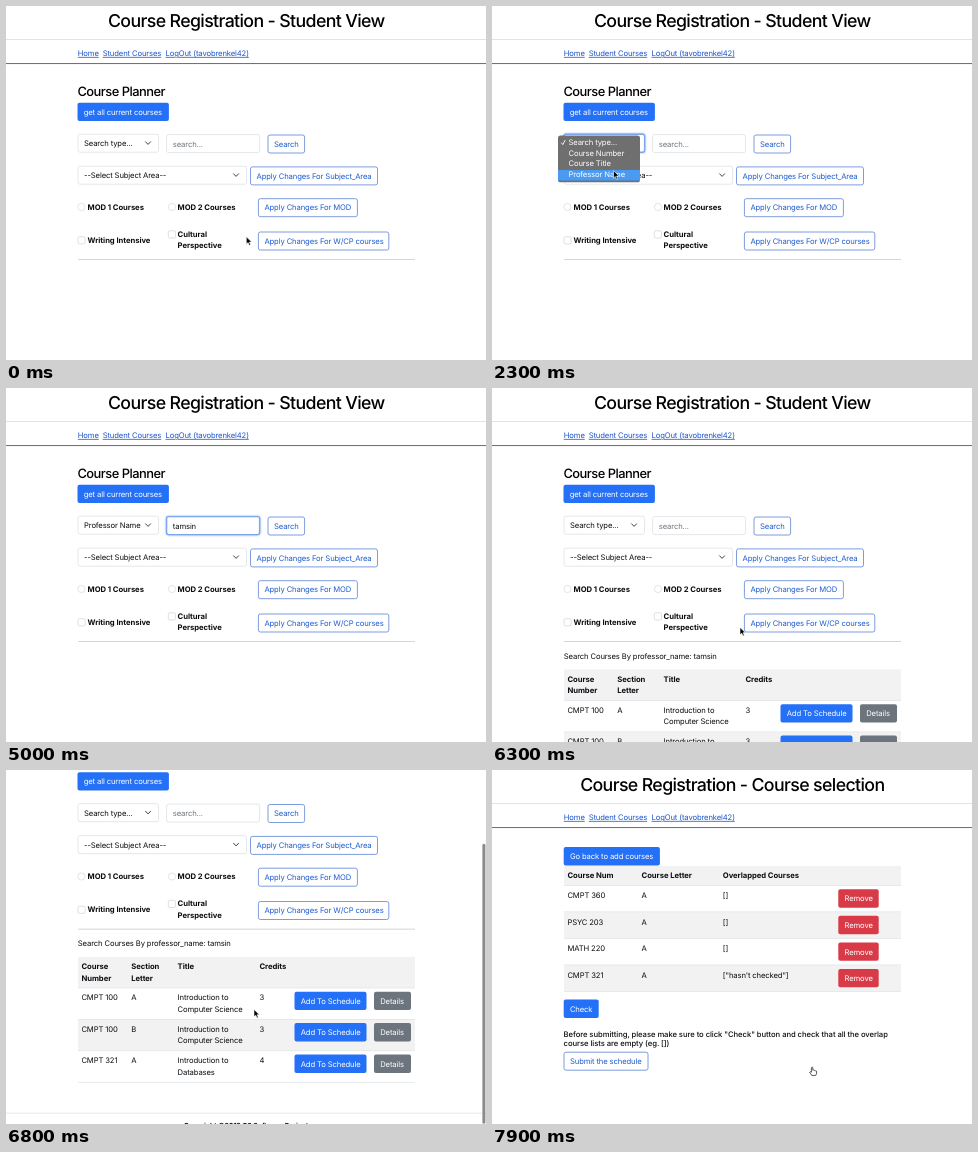
These frames come from a looping animation (480 px wide and 354 px high, 8 s). An HTML page:

```html
<!DOCTYPE html>
<html lang="en">
<head>
<meta charset="utf-8">
<title>Course Registration</title>
<style>
html, body { margin: 0; width: 100%; height: 100%; overflow: hidden; background: #fff; }
svg { display: block; width: 100vw; height: 100vh; }
text { font: 7.68px Inter, "Open Sans", sans-serif; letter-spacing: -.0176em; fill: #0c0e11; white-space: pre; text-rendering: geometricPrecision; }
.h1, .h3 { font-weight: 500; fill: #000; }
.h1 { font-size: 17.76px; letter-spacing: -.0355em; text-anchor: middle; }
.h3 { font-size: 12.9px; letter-spacing: -.04em; }
.b { font-weight: 700; letter-spacing: -.007em; }
.m { font-weight: 500; letter-spacing: -.009em; }
.w { fill: #fff; }
.hint { fill: #70767c; }
.blue { fill: #1f5cd0; }
.link { fill: #1a55c8; text-decoration: underline; }
.foot { font-size: 7px; font-weight: 700; text-anchor: middle; }
</style>
</head>
<body>
<svg id="stage" viewBox="0 0 480 354" preserveAspectRatio="none"></svg>
<script>
const BLUE = '#2470f6', EDGE = '#5c85d6', GRAY = '#6c757d', RED = '#d93a48', LINE = '#d9dde0', BAND = '#f2f2f2';
const LOOP = 8000, MAX_SCROLL = 94.5;
const QUERY = 'tamsin', USER = 'tavobrenkel42';
const MENU = ['Search type...', 'Course Number', 'Course Title', 'Professor Name'];

const text = (x, y, s, cls = '', id = '') => `<text x="${x}" y="${y}" class="${cls}" id="${id}">${s}</text>`;
const rect = (x, y, w, h, fill, extra = '') => `<rect x="${x}" y="${y}" width="${w}" height="${h}" fill="${fill}" ${extra}/>`;
const rule = (x, y, w, color, size = .7) => rect(x, y - size / 2, w, size, color);
const solid = (x, y, w, label, fill = BLUE, id = '') =>
  rect(x, y - .3, w, 18.4, fill, `rx="2" id="${id}"`) + text(x + 6.2, y + 11.8, label, 'w');
const outline = (x, y, w, label, id = '') =>
  `<g id="${id}">` + rect(x, y, w, 18, '#fff', `rx="2" stroke="${EDGE}" stroke-width=".8"`) +
  text(x + 6, y + 11.7, label, 'blue') + '</g>';
const field = (x, y, w, id = '') =>
  rect(x, y, w, 18, '#fff', `rx="2" stroke="${LINE}" stroke-width=".7" id="${id}"`);
const select = (x, y, w, label, id) => field(x, y, w, id + 'Box') + text(x + 6, y + 11.8, label, '', id) +
  `<path d="M${x + w - 13} ${y + 7.6}l2.5 2.6 2.5-2.6" fill="none" stroke="#343a40" stroke-width=".95" stroke-linecap="round"/>`;
const radio = (x, y) => `<circle cx="${x}" cy="${y}" r="3.6" fill="#fff" stroke="#d2d2d2" stroke-width=".6"/>`;
const check = (x, y) => rect(x, y, 7.2, 7.2, '#fff', 'rx="1.6" stroke="#cacaca" stroke-width=".6"');

const header = title =>
  text(240.3, 21.2, title, 'h1') + rule(0, 33.4, 480, '#dcdcdc', .8) +
  text(71.8, 49.9, 'Home', 'link') + text(96.7, 49.9, 'Student Courses', 'link') +
  text(159.5, 49.9, `LogOut (${USER})`, 'link') + rule(0, 57.6, 480, '#5c5c5c', .9);

function results() {
  const courses = [
    ['CMPT 100', 'A', 'Computer Science', 3],
    ['CMPT 100', 'B', 'Computer Science', 3],
    ['CMPT 321', 'A', 'Databases', 4]
  ];
  let s = text(71.8, 270.5, 'Search Courses By professor_name: ' + QUERY) + rect(72, 281.5, 337, 31, BAND) +
    text(75.4, 293.6, 'Course', 'b') + text(75.4, 305.1, 'Number', 'b') +
    text(125.2, 293.6, 'Section', 'b') + text(125.2, 305.1, 'Letter', 'b') +
    text(171.6, 293.6, 'Title', 'b') + text(253.5, 293.6, 'Credits', 'b');
  courses.forEach(([code, letter, topic, credits], i) => {
    const y = 312.5 + 31.4 * i, base = y + 12.4;
    if (i % 2) s += rect(72, y, 337, 31.4, BAND);
    s += rule(72, y, 337, '#dee2e6') + text(75.4, base, code) + text(125.2, base, letter) +
      text(171.6, base, 'Introduction to') + text(171.6, base + 11.5, topic) + text(253.5, base, credits) +
      solid(288.5, y + 4, 72, 'Add To Schedule', BLUE, 'add' + i) + solid(368, y + 4, 37, 'Details', GRAY);
  });
  return s + rule(72, 406.8, 337, '#dee2e6') + rule(0, 437.6, 480, '#dcdcdc') +
    text(240, 452, 'Copyright ©2019 CS Software Project', 'foot');
}

const planner = () => header('Course Registration - Student View') +
  text(71.4, 90, 'Course Planner', 'h3') + solid(71.5, 97, 91.4, 'get all current courses') +
  select(72, 128.2, 80.6, MENU[0], 'kind') +
  field(160.6, 128.6, 93, 'input') + text(166.8, 140.6, 'search...', 'hint', 'typed') +
  '<rect id="caret" y="133.5" width=".6" height="8.5" fill="#222"/>' +
  outline(262, 129, 36.6, 'Search', 'search') +
  select(72, 160.2, 168.6, '--Select Subject Area--', 'area') +
  outline(244.5, 160.9, 127, 'Apply Changes For Subject_Area') +
  radio(75.4, 201) + text(81.6, 203.7, 'MOD 1 Courses', 'b') +
  radio(166, 201) + text(171.6, 203.7, 'MOD 2 Courses', 'b') +
  outline(252.4, 192.7, 99, 'Apply Changes For MOD') +
  check(72, 230.7) + text(81.6, 236.8, 'Writing Intensive', 'b') +
  check(162.3, 224.8) + text(171.6, 230.9, 'Cultural', 'b') + text(171.6, 242.4, 'Perspective', 'b') +
  outline(252.4, 226, 130.4, 'Apply Changes For W/CP courses') +
  rule(72, 253.6, 337, '#c4c4c4') + `<g id="results">${results()}</g>`;

function schedule() {
  const rows = ['CMPT 360', 'PSYC 203', 'MATH 220', 'CMPT 321'];
  let s = header('Course Registration - Course selection') +
    solid(71.7, 77.4, 96.2, 'Go back to add courses') + rect(72, 96, 337, 19.3, BAND) +
    text(75.4, 108.2, 'Course Num', 'b') + text(149.6, 108.2, 'Course Letter', 'b') +
    text(230.8, 108.2, 'Overlapped Courses', 'b');
  rows.forEach((code, i) => {
    const y = 115.3 + 26.55 * i, base = y + 12.8;
    if (i % 2) s += rect(72, y, 337, 26.5, BAND);
    s += rule(72, y, 337, '#dee2e6') + text(75.4, base, code) + text(149.6, base, 'A') +
      text(230.8, base, i < 3 ? '[]' : '["hasn\'t checked"]') + solid(346.3, y + 4.3, 40.4, 'Remove', RED);
  });
  return s + rule(72, 221.5, 337, '#dee2e6') + solid(71.7, 229.8, 35, 'Check') +
    text(71.6, 267, 'Before submitting, please make sure to click "Check" button and check that all the overlap', 'm') +
    text(71.6, 276.2, 'course lists are empty (eg. [])', 'm') + outline(72, 282.2, 84, 'Submit the schedule');
}

const menu = () => rect(66, 129.5, 82, 46.8, '#6f6f6f', 'rx="2.6"') +
  rect(66, 0, 82, 10.6, '#4a9af2', 'id="pick"') +
  '<path d="M69.3 136.6l1.5 2 2.5-4.6" fill="none" stroke="#fff" stroke-width=".9"/>' +
  MENU.map((s, i) => text(76.5, 139.1 + 10.65 * i, s, 'w')).join('');

const cursor = () => '<circle id="ring" r="10.4" fill="none" stroke="#222" stroke-width="1"/>' +
  '<path id="arrow" d="M0 0V7.4L1.8 5.8 3 8.6 4.3 8 3.1 5.3H5.4Z" fill="#000" stroke="#fff" stroke-width=".6"/>' +
  '<path id="beam" d="M-1.3-4Q0-4 0-3Q0-4 1.3-4M0-3V3M-1.3 4Q0 4 0 3Q0 4 1.3 4" fill="none" stroke="#222" stroke-width=".7"/>' +
  '<path id="hand" d="M-.6.4Q0-.7.8.3V3Q1.7 2.5 2.2 3.2 3 2.8 3.5 3.6 4.6 3.4 4.6 4.6V6Q4.4 7 3.8 8.2H-.2Q-1.2 6.6-2.4 5.2-2.2 4-.6 5Z" fill="#fff" stroke="#222" stroke-width=".75" stroke-linejoin="round"/>';

const stage = document.getElementById('stage');
stage.innerHTML = rect(0, 0, 480, 354, '#fff') +
  `<g id="planner">${planner()}</g><g id="schedule">${schedule()}</g><g id="menu">${menu()}</g>` +
  rect(476.4, 0, 3, 280, '#8b8b8b', 'rx="1.5" id="thumb"') + `<g id="cursor">${cursor()}</g>`;

const el = {};
stage.querySelectorAll('[id]').forEach(n => { if (n.id) el[n.id] = n; });
const show = (id, on) => el[id].setAttribute('display', on ? 'inline' : 'none');
const set = (id, attrs) => { for (const k in attrs) el[id].setAttribute(k, attrs[k]); };
const within = (t, a, b) => t >= a && t < b;
const ease = p => p * p * (3 - 2 * p);
const ramp = (t, a, b) => ease(Math.min(1, Math.max(0, (t - a) / (b - a))));

// time, x, y
const path = [
  [0, 240.3, 230.8], [100, 240.3, 230.8], [300, 232, 238], [500, 232, 238], [1100, 118, 136],
  [2000, 118, 136], [2300, 121.5, 164.7], [2600, 121.5, 164.7], [3100, 188.8, 147.8], [3300, 190, 139],
  [5150, 190, 139], [5450, 281, 139], [5800, 281, 139], [6250, 248, 239.4],
  [6850, 248, 239.4], [7250, 320, 296.8], [7400, 320, 296.8], [7700, 320, 297.2]
];
function pointer(t) {
  const i = path.findIndex(k => k[0] > t);
  if (i < 0) return path[path.length - 1].slice(1);
  const a = path[i - 1], b = path[i], p = ramp(t, a[0], b[0]);
  return [a[1] + (b[1] - a[1]) * p, a[2] + (b[2] - a[2]) * p];
}

function outlineFocus(id, on) {
  set(id, {
    stroke: on ? '#7ea4ea' : LINE, 'stroke-width': on ? 1.4 : .7,
    style: on ? 'filter:drop-shadow(0 0 1px #8fb2f5)' : ''
  });
}

function draw(t) {
  const [x, y] = pointer(t);
  const loaded = t >= 5700, done = t >= 7500;
  const open = within(t, 1500, 2550), focus = within(t, 3400, 5700);
  const scroll = MAX_SCROLL * ramp(t, 6450, 6780);

  show('planner', !done);
  show('schedule', done);
  show('results', loaded);
  set('planner', { transform: `translate(0 ${-scroll})` });
  show('thumb', within(t, 6500, 7400));
  set('thumb', { y: scroll * .78 });

  show('menu', open);
  const row = Math.min(3, Math.max(0, Math.floor((y - 131.3) / 10.65)));
  set('pick', { y: 132 + 10.65 * row });
  el.kind.textContent = within(t, 2550, 5700) ? MENU[3] : MENU[0];
  outlineFocus('kindBox', within(t, 1400, 2700));
  if (within(t, 2700, 3400)) set('kindBox', { stroke: '#b4b9be' });

  const typed = focus ? QUERY.slice(0, Math.max(0, Math.floor((t - 3900) / 200) + 1)) : '';
  el.typed.textContent = typed || 'search...';
  set('typed', { class: typed ? '' : 'hint' });
  outlineFocus('input', focus);
  show('caret', focus && t < 4950 && !within(t, 3700, 3900));
  set('caret', { x: 167 + (typed ? el.typed.getComputedTextLength() : 0) });

  const hover = within(t, 5350, 5900);
  el.search.children[0].setAttribute('fill', hover ? BLUE : '#fff');
  el.search.children[1].setAttribute('class', hover ? 'w' : 'blue');
  const adding = within(t, 7150, 7500);
  set('add2', { fill: adding ? '#1c5fd6' : BLUE });

  const hand = hover || t >= 7150, beam = within(t, 3250, 3900);
  show('cursor', !within(t, 3900, 5150));
  set('cursor', { transform: `translate(${x} ${y})` });
  show('hand', hand);
  show('beam', beam);
  show('arrow', !hand && !beam);
  show('ring', within(t, 1400, 1600) || within(t, 2450, 2600) || within(t, 3050, 3300) ||
    within(t, 5500, 5700) || within(t, 7280, 7450));
}

const start = performance.now();
function tick() {
  draw((performance.now() - start) % LOOP);
  requestAnimationFrame(tick);
}
tick();
</script>
</body>
</html>
```
